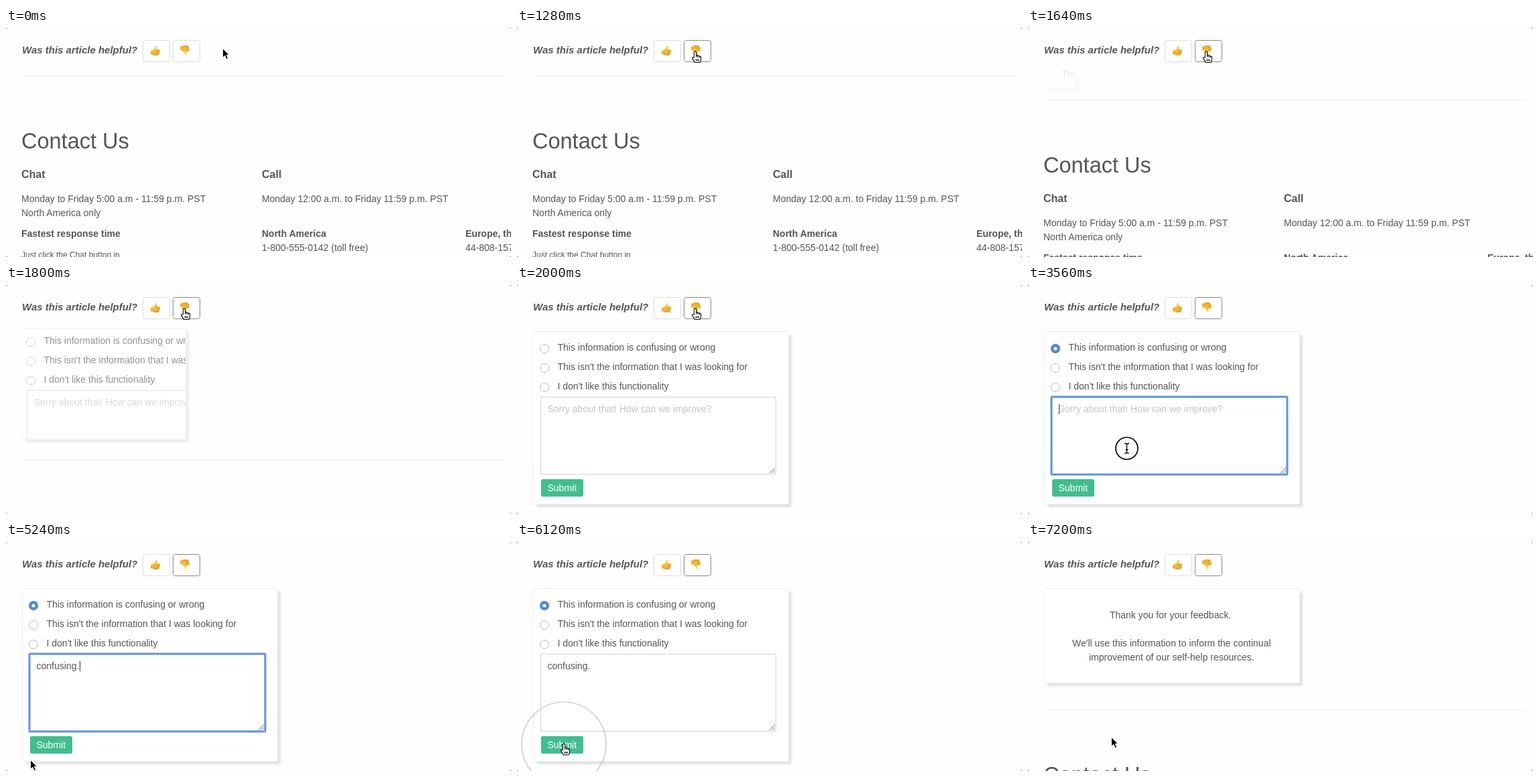
An HTML page that plays this animation: 754x342 px, repeating every 7.24 s.

```html
<!DOCTYPE html>
<html lang="en">
<head>
<meta charset="utf-8">
<title>Article feedback</title>
<style>
  html, body { margin: 0; width: 100%; height: 100%; overflow: hidden; background: #777; }
  #stage { position: absolute; left: 0; top: 0; width: 754px; height: 342px; overflow: hidden;
    background: #fefefe; border-radius: 3px; }
  svg { position: absolute; left: 0; top: 0; width: 754px; height: 342px; overflow: visible; }
  text { font: 14px "Liberation Sans", Arial, sans-serif; fill: #555; white-space: pre; }
  .b { font-weight: bold; }
  .head { font-size: 16px; }
  .title { font-size: 32.5px; }
  .small { font-size: 12px; }
  .ask { font: italic bold 15px "Liberation Sans", Arial, sans-serif; }
  .btn { fill: #fff; stroke: #ddd; }
  #panel { position: absolute; left: 24px; box-sizing: border-box; overflow: hidden;
    background: #fff; border: 1px solid #eee; box-shadow: 5px 5px 3px -1px #dfe2e5; }
  .radio { fill: #fff; stroke: #bbb; }
  #hint { fill: #c4c4c4; }
</style>
</head>
<body>
<div id="stage">
  <svg>
    <defs>
      <linearGradient id="gold" x2="0" y2="1">
        <stop offset="0" stop-color="#ffd95c"/><stop offset="1" stop-color="#e9a526"/>
      </linearGradient>
      <g id="thumb">
        <path d="M-7 0 L-4 -1 L-.5 -4 L.2 -7 Q1.6 -8.2 2.6 -6.6 L2.4 -2.2 H6 Q7.6 -1.6 6.8 .4 Q7.6 1.8 6.4 3 Q6.6 4.6 5.2 5.2 Q4.8 7 3 7 H-2 L-4.4 5.6 H-7 Z" fill="url(#gold)"/>
        <path d="M2.4 -2 L1.2 .4 M2.4 .5 H6.6 M2.4 3 H6.2 M2.2 5.2 H5" fill="none" stroke="#c98717" stroke-width=".7"/>
      </g>
    </defs>
    <text class="ask" x="24" y="38">Was this article helpful?</text>
    <rect class="btn" x="204.5" y="18.5" width="40" height="32" rx="3"/>
    <rect class="btn" id="down" x="249.5" y="18.5" width="40" height="32" rx="3"/>
    <use href="#thumb" x="223" y="34"/>
    <use href="#thumb" transform="translate(267 33) scale(1 -1)"/>
    <g id="page">
      <path d="M24 71.5H744" stroke="#eee"/>
      <text class="title" x="23" y="180">Contact Us</text>
      <text class="b head" x="23" y="224">Chat</text>
      <text x="23" y="260">Monday to Friday 5:00 a.m - 11:59 p.m. PST</text>
      <text x="23" y="281">North America only</text>
      <text class="b" x="23" y="312">Fastest response time</text>
      <text class="small" x="23" y="343">Just click the Chat button in</text>
      <text class="b head" x="382" y="224">Call</text>
      <text x="382" y="260">Monday 12:00 a.m. to Friday 11:59 p.m. PST</text>
      <text class="b" x="382" y="312">North America</text>
      <text x="382" y="333">1-800-555-0142 (toll free)</text>
      <text class="b" x="686" y="312">Europe, the Middle East</text>
      <text x="686" y="333">44-808-157</text>
    </g>
  </svg>

  <div id="panel">
    <svg id="inner">
      <g id="form">
        <circle class="radio" cx="41" cy="95" r="6.5"/>
        <circle class="radio" cx="41" cy="124" r="6.5"/>
        <circle class="radio" cx="41" cy="153" r="6.5"/>
        <g id="checked">
          <circle cx="41" cy="95" r="7" fill="#4f87e3"/>
          <circle cx="41" cy="95" r="2.6" fill="#fff"/>
        </g>
        <text x="60.5" y="98">This information is confusing or wrong</text>
        <text x="60.5" y="127">This isn't the information that I was looking for</text>
        <text x="60.5" y="156">I don't like this functionality</text>
        <rect x="35.5" y="167.5" width="351" height="115" fill="#fff" stroke="#d4d4d4"/>
        <path d="M377 281L385 273M381 281L385 277" stroke="#777"/>
        <g id="focus">
          <rect x="35" y="167" width="352" height="116" rx="1.5" fill="none" stroke="#a9c6f1" stroke-width="4"/>
          <rect x="35" y="167" width="352" height="116" rx="1" fill="none" stroke="#5f93dc" stroke-width="2"/>
          <path id="caret" d="M46.5 178V193" stroke="#333"/>
        </g>
        <text id="hint" x="45.5" y="190">Sorry about that! How can we improve?</text>
        <text id="typed" x="45.5" y="190"></text>
        <rect x="36" y="290" width="63" height="26" rx="2.5" fill="#42bd90"/>
        <text x="45.5" y="308" style="fill:#fff">Submit</text>
      </g>
      <g id="thanks">
        <text x="122" y="114">Thank you for your feedback.</text>
        <text x="66" y="156">We'll use this information to inform the continual</text>
        <text x="91" y="177">improvement of our self-help resources.</text>
      </g>
    </svg>
  </div>

  <svg>
    <circle id="ring" fill="none" stroke="#000" stroke-width="1.7"/>
    <g id="cursor">
      <path id="arrow" d="M.5 .5V14.2L3.7 11.2L6.2 16.6L8.6 15.5L6.2 10.3H10.3Z" fill="#000" stroke="#fff"/>
      <path id="hand" d="M-1.6 8.5V1Q-1.6 -.6 0 -.6Q1.6 -.6 1.6 1V5.4Q3.2 4.6 4 6Q5.6 5.2 6.4 6.8Q8.6 6.2 8.6 8.6V11.5Q8.4 14 7 16H-.6Q-1.6 13.6 -4.2 10.4Q-5 8.6 -3.4 8.2Q-2.4 8 -1.6 9.6M1.6 5.4V8M4 6V8.5M6.4 6.8V9M1.3 11V14M3.3 11V14M5.3 11V14" fill="#fff" stroke="#000" stroke-width="1.1"/>
      <path id="beam" d="M-3.5 -7.5Q0 -7.5 0 -5Q0 -7.5 3.5 -7.5M0 -5.5V5.5M-3.5 7.5Q0 7.5 0 5Q0 7.5 3.5 7.5M-2 2H2" fill="none" stroke="#000" stroke-width="1.3"/>
    </g>
  </svg>
</div>
<script>
const LOOP = 7240, STEP = 40;
const OPEN = 1540, OPEN_MS = 440, CHECK = 3080, FOCUS = 3560;
const TYPE = 4040, KEY_MS = 80, DOT = 4840, WAKE = 5080, BLUR = 6000, DONE = 6200;

// time, x, y of the pointer's hot spot
const path = [
  [0, 323, 30], [320, 266, 35.5], [2200, 266, 35.5], [2600, 70, 139],
  [2880, 42, 98], [3200, 42, 98], [3520, 147.5, 244], [5040, 147.5, 244],
  [5240, 36, 325], [5360, 33, 324], [5800, 70, 302], [7080, 70, 302], [7200, 124, 291]
];
// start, end, first radius, growth per step
const clicks = [[840, 960, 31, 0], [3000, 3080, 22.5, 0], [3560, 3720, 16.5, 15.5], [6000, 6160, 16.5, 15.5]];

const el = id => document.getElementById(id);
const show = (id, on) => { el(id).style.display = on ? '' : 'none'; };
const clamp = v => Math.min(1, Math.max(0, v));
const swing = v => 0.5 - Math.cos(Math.PI * clamp(v)) / 2;

function pointerAt(t) {
  const next = path.findIndex(k => k[0] > t);
  if (next < 0) return path[path.length - 1].slice(1);
  const a = path[next - 1], b = path[next], p = swing((t - a[0]) / (b[0] - a[0]));
  return [a[1] + (b[1] - a[1]) * p, a[2] + (b[2] - a[2]) * p];
}

function drawPanel(t) {
  const p = swing((t - OPEN) / OPEN_MS), q = 1 - p;
  const height = t < DONE ? 259 : 142, top = 58 + 11 * p;
  show('panel', p > 0);
  Object.assign(el('panel').style, {
    top: top + 'px', width: 382 * p + 'px', height: height * p + 'px', opacity: p
  });
  Object.assign(el('inner').style, {
    left: -25 - 11 * q + 'px', top: -top - 1 - 27.6 * q + 'px'
  });
  el('page').setAttribute('transform', `translate(0 ${Math.round((height + 37) * p)})`);
}

function drawForm(t) {
  const keys = t < TYPE ? 0 : Math.min(9, 1 + Math.floor((t - TYPE) / KEY_MS));
  const typed = 'confusing.'.slice(0, t >= DOT ? 10 : keys);
  show('form', t < DONE);
  show('thanks', t >= DONE);
  show('checked', t >= CHECK);
  show('focus', t >= FOCUS && t < BLUR);
  show('hint', !typed);
  el('typed').textContent = typed;
  const caret = t < DONE && typed ? Math.round(el('typed').getComputedTextLength()) : 0;
  el('caret').setAttribute('transform', `translate(${caret} 0)`);
  el('down').style.stroke = t >= 1280 ? '#888' : '';
}

function drawPointer(t) {
  const [x, y] = pointerAt(t);
  const inside = (l, top, r, b) => x >= l && x <= r && y >= top && y <= b;
  const form = t > 2000 && t < DONE;
  const kind = inside(204, 18, 290, 51) || form && inside(36, 290, 99, 316) ? 'hand'
    : form && inside(35, 167, 387, 283) ? 'beam' : 'arrow';
  ['arrow', 'hand', 'beam'].forEach(k => show(k, k === kind));
  show('cursor', t < TYPE || t >= WAKE);
  el('cursor').setAttribute('transform', `translate(${x} ${y})`);

  const click = clicks.find(c => t >= c[0] && t < c[1]);
  show('ring', click);
  if (!click) return;
  const [start, , radius, growth] = click, n = (t - start) / STEP;
  const r = radius + growth * n;
  const ring = { cx: x, cy: y, r, opacity: clamp(1.3 - r / 56) };
  for (const name in ring) el('ring').setAttribute(name, ring[name]);
}

function draw(now) {
  const t = Math.floor((now % LOOP) / STEP) * STEP;
  drawPanel(t);
  drawForm(t);
  drawPointer(t);
}

let begin;
function tick(now) {
  begin ??= now;
  draw(now - begin);
  requestAnimationFrame(tick);
}
draw(0);
requestAnimationFrame(tick);
</script>
</body>
</html>
```
